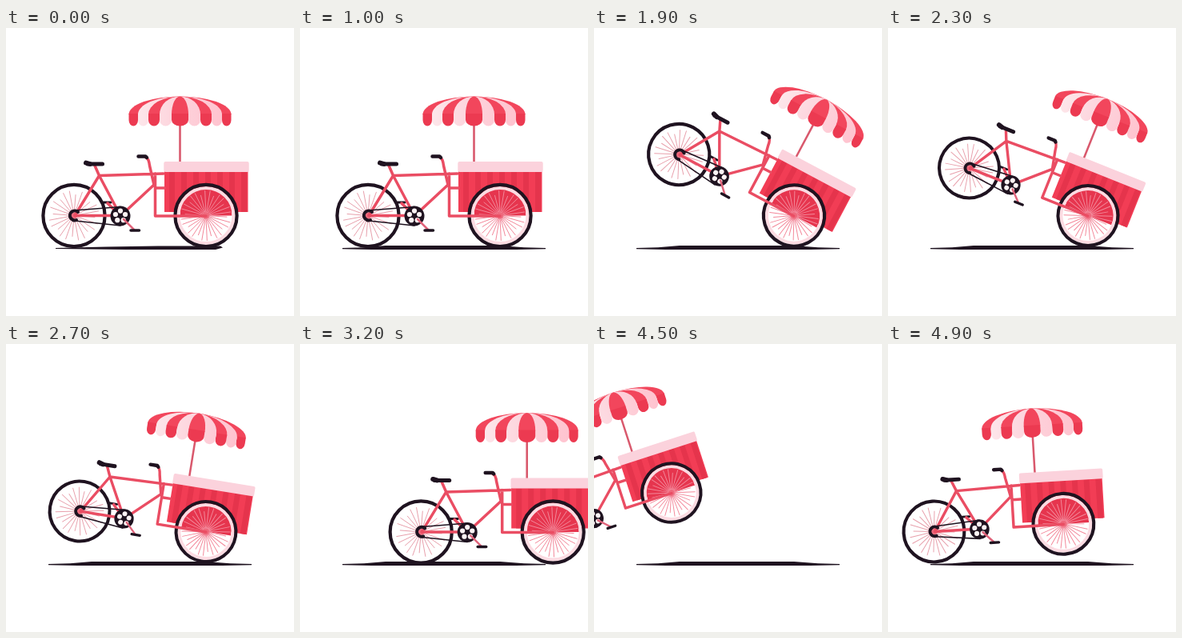
An HTML page that plays this animation: 360 px wide and 360 px high, repeating every 5000 ms.

```html
<!DOCTYPE html>
<html lang="en">
<head>
<meta charset="utf-8">
<title>Ice cream cart</title>
<style>
  html, body { margin: 0; width: 100%; height: 100%; overflow: hidden; background: #fff; }
  svg { display: block; width: 100%; height: 100%; }
  .ink { stroke: #1f1320; }
  .tube { stroke: #ea4d63; stroke-width: 3.5; }
</style>
</head>
<body>
<svg viewBox="0 0 360 360" fill="none" stroke-linecap="round" stroke-linejoin="round">
  <defs>
    <linearGradient id="pale" gradientUnits="userSpaceOnUse" x1="165" x2="270" y1="0" y2="0">
      <stop offset="0" stop-color="#fde6ea"/>
      <stop offset=".4" stop-color="#fdd6de"/>
      <stop offset="1" stop-color="#ffc3cf"/>
    </linearGradient>
  </defs>
  <path id="ground" fill="#1f1320"/>
  <g id="bike">
    <path stroke="#d9596d" stroke-width="2.6" d="M217.5 118V168"/>
    <g id="canopy"></g>
    <g id="cart">
      <path fill="#f23d55" d="M198 178H302.500V230H198Z"/>
    </g>
    <rect x="197.300" y="167" width="106.400" height="13" rx="2" fill="#fbd2dc"/>
    <path fill="#e6354e" d="M217.500 234.500A32.500 32.500 0 0 1 282.500 234.500Z"/>
    <g id="wheels"></g>
    <path class="ink" stroke-width="3" d="M122 218H131"/>
    <path class="tube" stroke-width="2" d="M127 219L143 235"/>
    <path class="tube" d="M111 172L116.500 184.500L86 234.500H143L116.500 184.500L197 182M185 196L143 235
      M186.500 182V235H250M187 200H198M175 162Q178.500 163 179.500 172L185 196"/>
    <path class="ink" stroke-width="1.6" d="M86 228L143 223.500M86 241L143 247"/>
    <path class="ink" stroke-width="4" d="M90 230A6 6 0 1 0 88 240"/>
    <g id="ring"><circle cx="143" cy="235" r="12.500" fill="#1f1320"/></g>
    <path stroke="#e0637a" stroke-width="2.500" d="M147 239L160 252"/>
    <path class="ink" stroke-width="3.500" d="M156 253H166.500"/>
    <path class="ink" stroke-width="6" d="M100 168.500L105 170"/>
    <path class="ink" stroke-width="5" d="M102 170H120.500"/>
    <path class="ink" stroke-width="4.500" d="M165.500 160.500H174.500L176 162"/>
  </g>
</svg>
<script>
const $ = id => document.getElementById(id);
const AXLE = 234.5, REAR = 85, FRONT = 250, TAU = Math.PI * 2;

function add(parent, tag, attrs) {
  const el = document.createElementNS('http://www.w3.org/2000/svg', tag);
  for (const k in attrs) el.setAttribute(k, attrs[k]);
  parent.appendChild(el);
}

function drawCanopy() {
  const g = $('canopy'), mid = 217.5;
  const edges = [64, 52.5, 39.5, 25.5, 10.5];
  const tone = (i, red) => i % 2 ? 'url(#pale)' : red;
  edges.forEach((r, i) => add(g, 'path', {
    d: `M${mid - r} 108A${r} 22.500 0 0 1 ${mid + r} 108Z`, fill: tone(i, '#f2465c')
  }));
  const flap = (a, b, i) => add(g, 'path', {
    d: `M${a} 107H${b}V115A${(b - a) / 2} 7.500 0 0 1 ${a} 115Z`, fill: tone(i, '#ec3a51')
  });
  edges.forEach((r, i) => {
    const inner = i < 4 ? edges[i + 1] : -r;
    flap(mid - r, mid - inner, i);
    if (i < 4) flap(mid + inner, mid + r, i);
  });
}

function drawStripes() {
  for (let x = 204; x < 300; x += 15)
    add($('cart'), 'rect', { x, y: 180, width: 7, height: 50, fill: '#e5344c' });
}

function drawWheel(cx, color, count) {
  const g = $('wheels');
  let d = '';
  for (let i = 0; i < count; i++) {
    const a = (i + .3) / count * TAU, c = Math.cos(a), s = Math.sin(a);
    const end = i % 3 ? 31 : 26;
    d += `M${cx + c * 4} ${AXLE + s * 4}L${cx + c * end} ${AXLE + s * end}`;
  }
  add(g, 'path', { d, stroke: color, 'stroke-width': 1 });
  if (cx === FRONT)
    add(g, 'circle', { cx, cy: AXLE, r: 34.5, stroke: '#fcdbe2', 'stroke-width': 4 });
  add(g, 'circle', { cx, cy: AXLE, r: 38.6, class: 'ink', 'stroke-width': 4.2 });
  add(g, 'circle', { cx, cy: AXLE, r: 4, fill: '#ee6a7d' });
}

function drawRing() {
  for (let i = 0; i < 5; i++) {
    const a = (i / 5 - .25) * TAU;
    add($('ring'), 'circle', {
      cx: 143 + 6.4 * Math.cos(a), cy: 235 + 6.4 * Math.sin(a), r: 3.1, fill: '#fff4f5'
    });
  }
}

// tilt: share of the full lean, blended as a matrix so the bike shrinks slightly mid-way
function pose(t) {
  if (t < 1000) return { tilt: 0, lean: 0, px: FRONT, dx: 0, dy: 0 };
  if (t < 3000) return { tilt: 1 - Math.abs(t - 2000) / 1000, lean: 31, px: FRONT, dx: 0, dy: 0 };
  if (t < 4000) return { tilt: 0, lean: 0, px: FRONT, dx: (t - 3000) * .331, dy: (t - 3000) * .0023 };
  return { tilt: (5000 - t) / 1000, lean: -36, px: REAR, dx: (t - 5000) * .275, dy: 0 };
}

const SHORT = 'M62 275L125 273.500L190 272.500H268L271 274.500L262 277H150L62 276Z';
const LONG = 'M53 275L80 274.300L107 272H250L280 274.300L307 275V276.300L270 277H90L53 276.300Z';

function render(t) {
  const { tilt, lean, px, dx, dy } = pose(t);
  const a = lean * Math.PI / 180;
  const c = 1 - tilt + tilt * Math.cos(a), s = tilt * Math.sin(a);
  const e = px + dx - c * px + s * AXLE, f = AXLE + dy - s * px - c * AXLE;
  $('bike').setAttribute('transform', `matrix(${c} ${s} ${-s} ${c} ${e} ${f})`);
  $('ground').setAttribute('d', t < 1000 ? SHORT : LONG);
}

drawCanopy();
drawStripes();
drawWheel(REAR, '#e8a0ac', 24);
drawWheel(FRONT, '#f3889a', 30);
drawRing();

const start = performance.now();
function tick() {
  const t = (performance.now() - start) % 5000;
  render(Math.floor(t / 100) * 100);
  requestAnimationFrame(tick);
}
tick();
</script>
</body>
</html>
```
